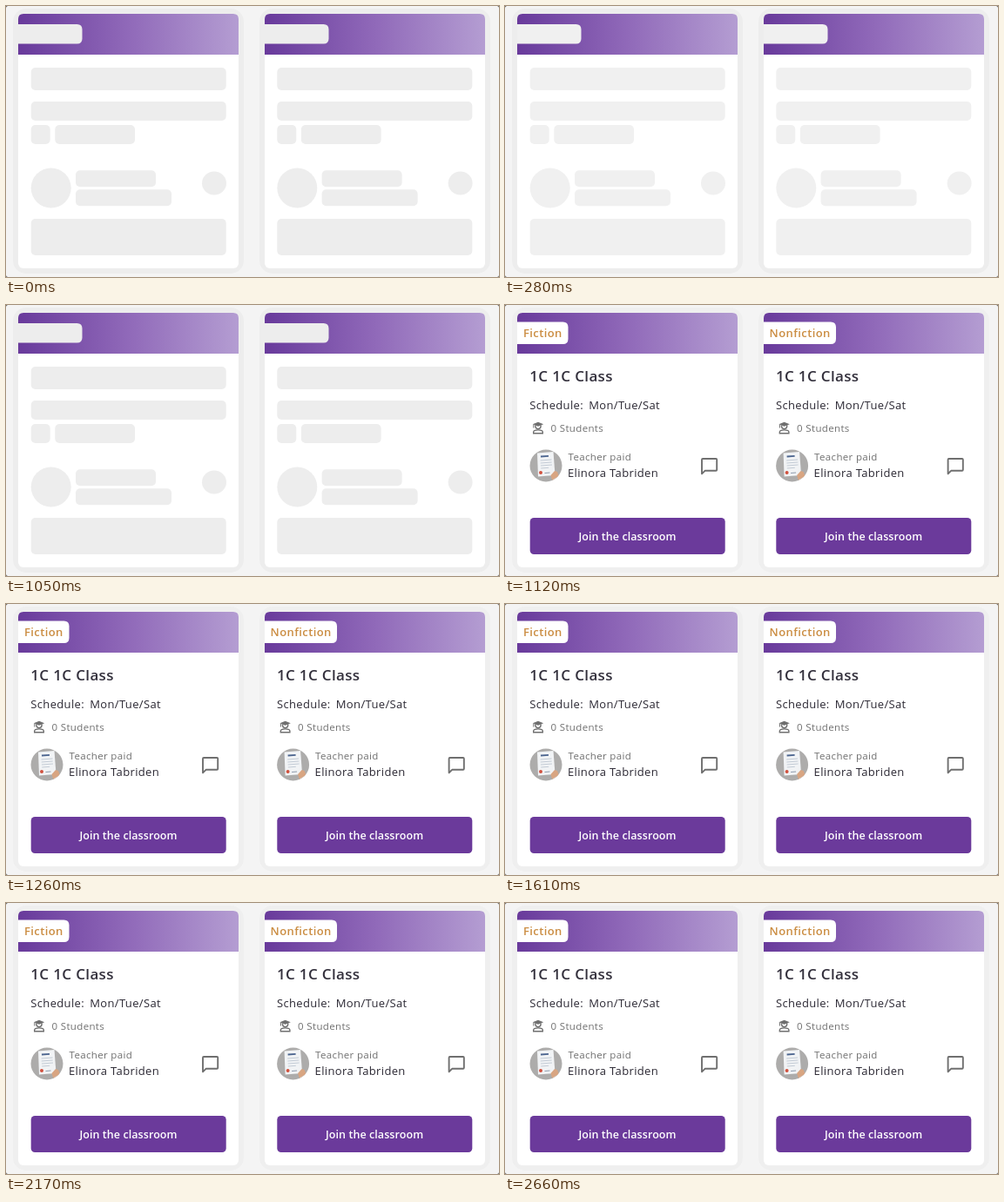
An HTML page that plays this animation: 566x312 px, repeating every 2.73 s.

```html
<!DOCTYPE html>
<html lang="en">
<head>
<meta charset="utf-8">
<title>Classroom cards</title>
<style>
  html, body { margin: 0; width: 100%; height: 100%; overflow: hidden; background: #555; }
  svg { display: block; width: 566px; height: 312px; }
  text { font-family: "Open Sans", "Noto Sans", sans-serif; letter-spacing: .35px; fill: #2b2833; }
  .badge { font-size: 13px; font-weight: 600; fill: #cb8d42; letter-spacing: .4px; }
  .title { font-size: 17px; font-weight: 600; fill: #33303c; }
  .body { font-size: 13px; font-weight: 500; }
  .note { font-size: 11.5px; fill: #707070; }
  .action { font-size: 12.5px; font-weight: 600; fill: #fff; letter-spacing: .08px; text-anchor: middle; }
  .icon { fill: none; stroke: #6f6f6f; }
</style>
</head>
<body>
<svg id="stage" viewBox="0 0 566 312">
  <defs>
    <linearGradient id="banner">
      <stop offset="0" stop-color="#693a9b"/>
      <stop offset=".06" stop-color="#6d409f"/>
      <stop offset=".5" stop-color="#9069b9"/>
      <stop offset="1" stop-color="#b49dd2"/>
    </linearGradient>
    <clipPath id="round"><circle cx="47" cy="185" r="18.5"/></clipPath>

    <g id="frame">
      <rect class="halo" x="8" y="3" width="265" height="305" rx="15"/>
      <rect x="14" y="9" width="253" height="293" rx="6" fill="#fff"/>
      <path d="M14 56V15q0-6 6-6h241q6 0 6 6v41z" fill="url(#banner)"/>
    </g>

    <g id="avatar" clip-path="url(#round)">
      <rect x="28" y="166" width="38" height="38" fill="#adacab"/>
      <path d="M37 170.5l18.500-1.500 2 27-19.500 1.500z" fill="#f1f3f5"/>
      <path d="M41 174.500l9-.7" stroke="#4d6690" stroke-width="1.800"/>
      <path d="M40.500 179l13-1M40.700 182l13-1M41 185l13-1M41.200 188l9-.7" stroke="#c3cbd5"/>
      <circle cx="41" cy="193" r="2" fill="#d0523f"/>
      <path d="M45.500 193.500l6-.5" stroke="#8c99ab"/>
      <path d="M52.500 196l4.500-5 3 1 3 8-4 5-5-4z" fill="#d8a582"/>
      <path d="M55 201l7-4 5 4-6 6z" fill="#d9dde3"/>
    </g>

    <g id="student" class="icon" stroke-width="1.400">
      <path d="M31.800 137.300l6.200-2.500 6.200 2.500-6.200 2.400z" fill="#6f6f6f" stroke="none"/>
      <path d="M34.900 138.300v1.300a3.100 3.100 0 0 0 6.200 0v-1.300"/>
      <path d="M32.700 147.700v-1.300c0-1.700 3-2.500 5.300-2.500s5.300.8 5.300 2.500v1.300z"/>
      <path d="M32.800 137.500v4" stroke-width="1"/>
    </g>

    <path id="chat" class="icon" stroke-width="1.900" stroke-linejoin="round"
      d="M226 178q0-1 1-1h15.200q1 0 1 1v11.800q0 1-1 1h-12.700l-3.500 3.500z"/>
  </defs>
  <rect width="566" height="312" rx="2.500" fill="#f4f4f4"/>
  <g id="frames"></g>
  <g id="loading"></g>
  <g id="loaded"></g>
</svg>
<script>
const LOOP = 2730, READY = 1120, PULSE = 1060;
const CARDS = [
  { label: "Fiction", badge: 58.5, frameX: 0, x: 0 },
  { label: "Nonfiction", badge: 83, frameX: 283, x: 282.6 }
];
// x, y, width, height, corner radius
const BONES = [
  [28.7, 71, 224, 26, 5], [28.7, 110, 224, 22, 5],
  [28.7, 137, 22, 22, 5], [56.3, 137, 91.700, 22, 5],
  [28.7, 186.500, 46, 46, 23], [80, 189.300, 92, 19, 5],
  [80, 211.300, 110, 19, 5], [225, 190.500, 28, 27, 14],
  [28.700, 245, 224, 42, 5]
];

const byId = id => document.getElementById(id);
const text = (kind, x, y, words) => `<text class="${kind}" x="${x}" y="${y}">${words}</text>`;
const rect = ([x, y, w, h, r], fill = "") =>
  `<rect x="${x}" y="${y}" width="${w}" height="${h}" rx="${r}" ${fill}/>`;
const tab = (y, w, h) => `<path d="M14 ${y}h${w - 6}q6 0 6 6v${h - 12}q0 6-6 6h${6 - w}z"/>`;
const at = (x, inner) => `<g transform="translate(${x} 0)">${inner}</g>`;

const skeleton = card =>
  at(card.frameX, tab(21, 73.5, 22.5)) + at(card.x, BONES.map(b => rect(b)).join(""));

const content = card =>
  at(card.frameX, `<g fill="#fff">${tab(19.5, card.badge, 25.5)}</g>`) +
  at(card.x, [
    text("badge", 21, 37, card.label),
    text("title", 28.3, 88, "1C 1C Class"),
    text("body", 28.3, 120, "Schedule:"),
    text("body", 96.200, 120.300, "Mon/Tue/Sat"),
    '<use href="#student"/>',
    text("note", 52.500, 145.800, "0 Students"),
    '<use href="#avatar"/>',
    text("note", 72.500, 179.300, "Teacher paid"),
    text("body", 72, 197.500, "Elinora Tabriden"),
    '<use href="#chat"/>',
    rect([28.700, 245, 224, 42, 4.500], 'fill="#6b3a9b"'),
    text("action", 140.500, 271, "Join the classroom")
  ].join(""));

byId("frames").innerHTML = CARDS.map(c => at(c.frameX, '<use href="#frame"/>')).join("");
byId("loading").innerHTML = CARDS.map(skeleton).join("");
byId("loaded").innerHTML = CARDS.map(content).join("");

const grey = v => `rgb(${v},${v},${v})`;
const show = (id, on) => byId(id).setAttribute("visibility", on ? "visible" : "hidden");

function draw(now) {
  const t = now % LOOP;
  const ready = t >= READY;
  const glow = (1 - Math.cos(2 * Math.PI * t / PULSE)) / 2;
  show("loading", !ready);
  show("loaded", ready);
  byId("loading").setAttribute("fill", grey(Math.round(237 + 6 * glow)));
  byId("frames").setAttribute("fill", grey(ready ? 239 : 237));
}

const start = performance.now();
function tick() {
  draw(performance.now() - start);
  requestAnimationFrame(tick);
}
tick();
</script>
</body>
</html>
```
